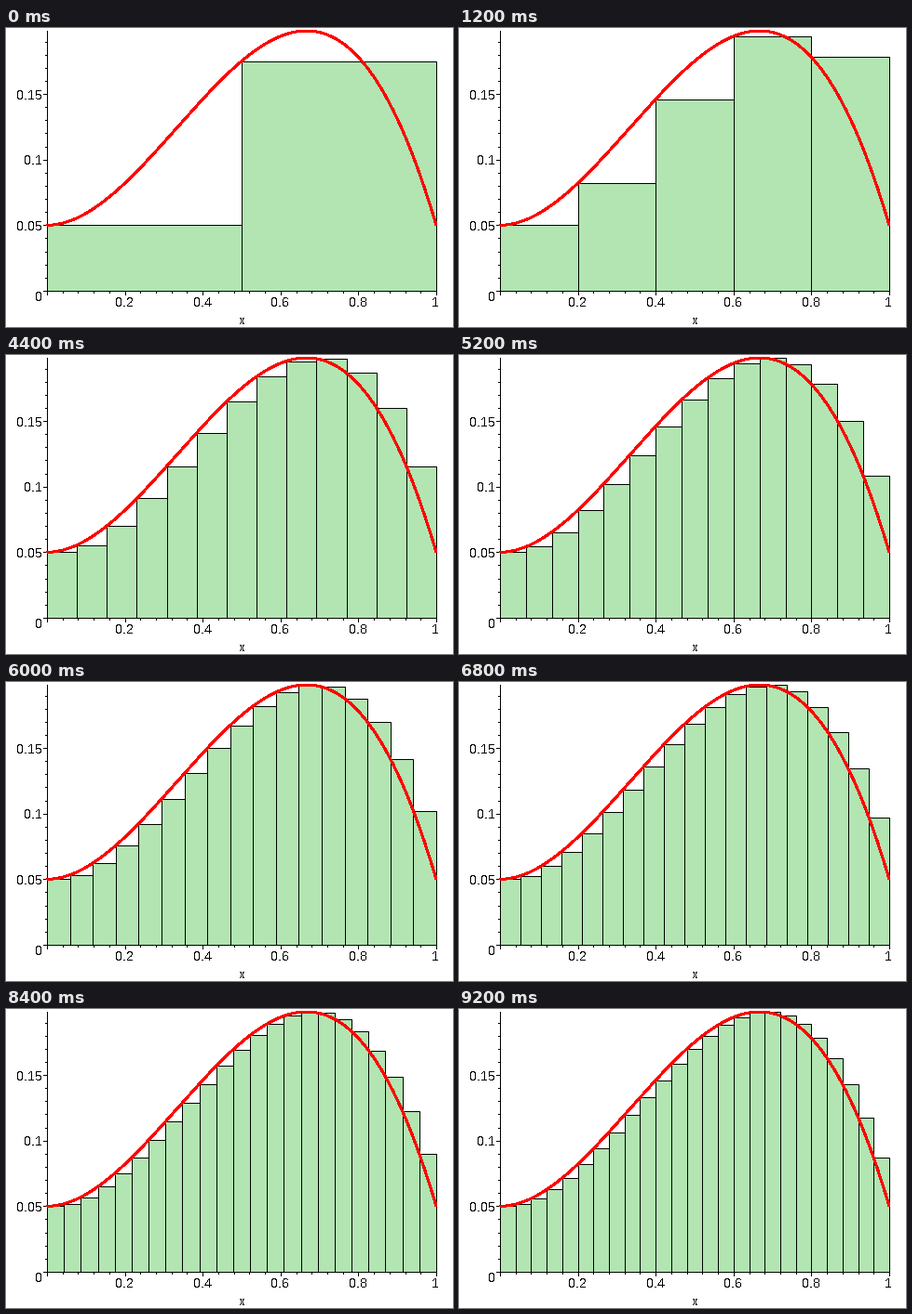
Animation, 480 px wide and 322 px high, one loop 9600 ms. Source, as a matplotlib script:

```python
import numpy as np
import matplotlib.pyplot as plt
from matplotlib.animation import FuncAnimation
from matplotlib.patches import Rectangle

# Crisp pixels: no automatic snapping and no smoothed text
plt.rcParams.update({"path.snap": False, "text.antialiased": False,
                     "text.hinting": "native", "text.hinting_factor": 1})


def f(x):
    return x**2 - x**3 + 0.05


W, H, DPI = 480, 322, 72
LEFT, TOP, BASE = 44, 3, 283            # plot edges in pixels
X_SCALE = 418                           # pixels per unit
Y_SCALE = (BASE - TOP) / f(2 / 3)       # the peak touches the top edge
FIRST, LAST = 2, 25                     # number of rectangles
GREEN = "#b2e5b2"


def px(x):
    return LEFT + X_SCALE * x


def py(y):
    return BASE - Y_SCALE * y


def pixel(v):
    """Centre of the pixel nearest to v."""
    return np.floor(v + 0.5) + 0.5


def line(xs, ys):
    ax.plot(xs, ys, color="black", lw=1, zorder=3, solid_capstyle="butt")


def label(x, y, text, size=14, ha="center"):
    ax.text(x, y, text, fontsize=size, family="Liberation Sans",
            ha=ha, va="center_baseline", color="black")


fig = plt.figure(figsize=(W / DPI, H / DPI), dpi=DPI, facecolor="white")
ax = fig.add_axes([0, 0, 1, 1])
ax.set_xlim(0, W)
ax.set_ylim(H, 0)
ax.axis("off")

# Axes and ticks, five steps between labels
x0, y0 = LEFT + 0.5, BASE + 0.5
line([x0, x0], [TOP, BASE + 1])
line([LEFT, px(1) + 1], [y0, y0])
for i in range(26):
    x = pixel(px(i * 0.04))
    line([x, x], [BASE, BASE + (5 if i % 5 == 0 else 3)])
for i in range(20):
    y = pixel(py(i * 0.01))
    line([LEFT - (4 if i % 5 == 0 else 2), LEFT], [y, y])

for v in (0.2, 0.4, 0.6, 0.8, 1):
    label(px(v) - (1 if v == 1 else 0), 294.5, f"{v:g}")
for v in (0.05, 0.1, 0.15):
    label(39.5, py(v) + 0.5, f"{v:g}", ha="right")
label(39.5, 289.5, "0", ha="right")
label(253.5, 314.5, "x", size=12)

t = np.linspace(0, 1, 200)
ax.plot(px(t), py(f(t)), color="red", lw=2, zorder=5, antialiased=False,
        solid_capstyle="butt")

bars = [ax.add_patch(Rectangle((0, 0), 0, 0, fc=GREEN, ec="black", lw=1,
                               zorder=2)) for _ in range(LAST)]


def draw(frame):
    n = FIRST + frame
    for k, bar in enumerate(bars):
        bar.set_visible(k < n)
        if k < n:
            a, b = pixel(px(k / n)), pixel(px((k + 1) / n))
            top = pixel(py(f(k / n)))
            bar.set_bounds(a, top, b - a, y0 - top)
    return bars


anim = FuncAnimation(fig, draw, frames=LAST - FIRST + 1, interval=400,
                     repeat=True, repeat_delay=0, blit=False)
plt.show()
```
